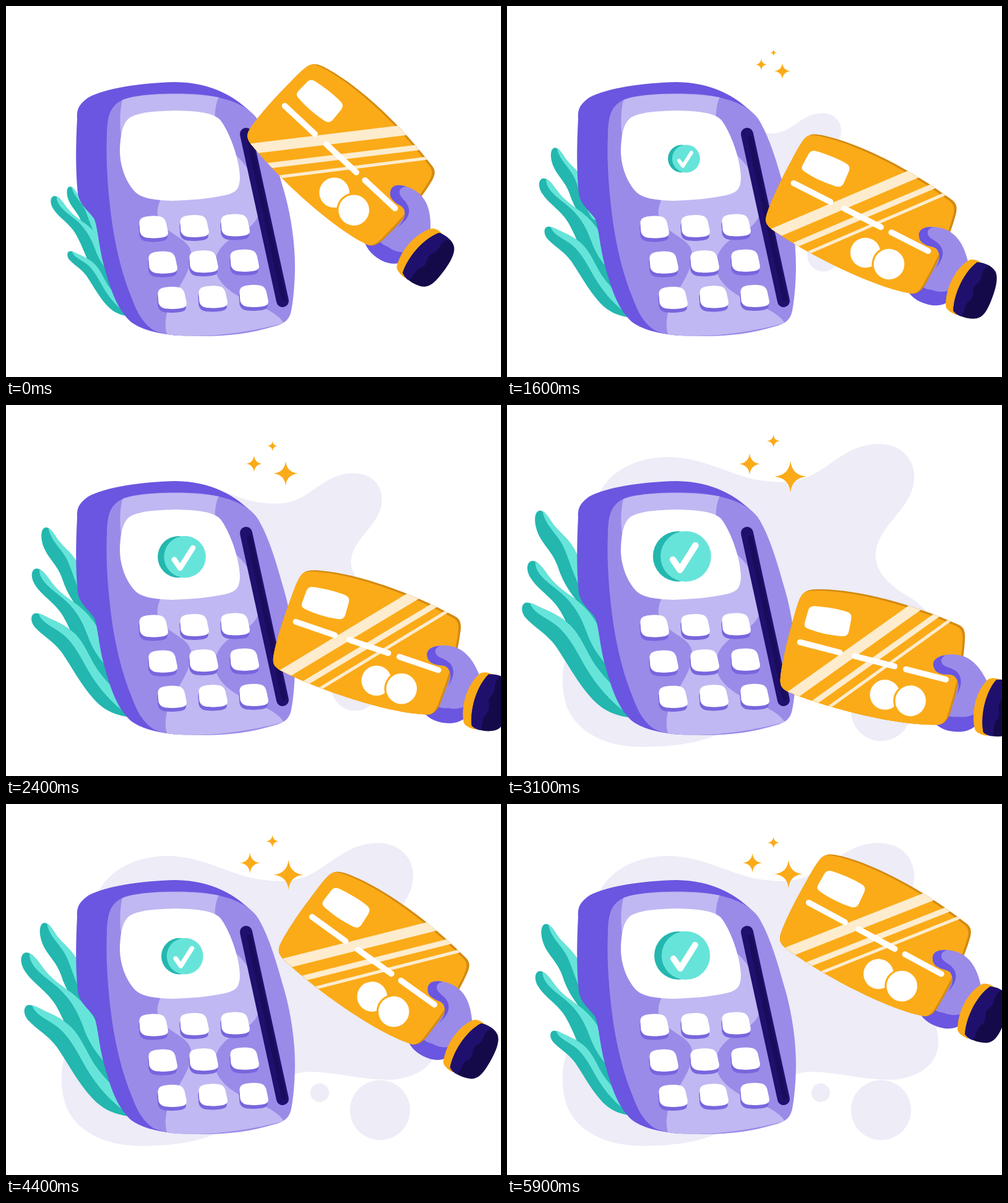
Write an HTML page with a canvas that moves like this. It is 800 by 600 pixels and loops after 6000 ms.

```html
<!DOCTYPE html>
<html lang="en">
<head>
<meta charset="utf-8">
<title>Card payment</title>
<style>
  html, body { margin: 0; width: 100%; height: 100%; overflow: hidden; background: #fff; }
  canvas { display: block; width: 800px; height: 600px; }
</style>
</head>
<body>
<canvas id="stage" width="800" height="600"></canvas>
<script>
const ctx = document.getElementById('stage').getContext('2d');
const LOOP = 6000, STEP = 100;

const C = {
  violet: '#6a56e0', lilac: '#9a8be9', pale: '#c0b8f2', keyShade: '#7766dd',
  navy: '#20106e', ink: '#150a49', orange: '#fbab18', rim: '#d48a10', cream: '#fdecce',
  teal: '#67e4da', deepTeal: '#23b7af', mist: '#edecf7', white: '#fff'
};

// Key times and values of each moving part
const KEYS = {
  cardX: [[0, 391], [3000, 442], [4500, 441]],
  cardY: [[0, 205], [3000, 467], [4500, 216.5]],
  cardAngle: [[0, 24.2], [3000, -6], [4500, 18.6], [5900, 9.6]],
  blob: [[0, 0], [3000, 1]],
  badge: [[0, 0], [3000, 97], [4060, 62.5], [5900, 90]],
  sparkle: [[0, 0], [3600, 1.05], [5200, .655], [5900, .8]]
};

const LEAVES = [
  { base: [188, 496], keys: [[0, .63], [3400, 1.04], [5200, .855], [5900, .932]],
    body: 'M53 172C44 174 44 191 50 207C58 227 74 238 82 261C91 290 107 313 127 332L160 400L180 380L140 300C125 275 118 250 108 232C96 213 83 206 73 191C66 180 61 172 53 172Z',
    light: 'M58 173C62 196 82 210 91 229C102 252 108 282 128 312L150 320L140 300C125 275 118 250 108 232C96 213 83 206 73 191C68 183 64 176 58 173Z' },
  { base: [190, 472], keys: [[0, .707], [4100, 1.02], [5900, .866]],
    body: 'M31 239C22 241 21 255 29 268C42 289 66 301 80 325C97 354 108 391 125 421C141 449 162 478 195 498L205 440L150 360C137 333 124 319 105 304C85 290 72 281 60 265C50 251 41 238 31 239Z',
    light: 'M37 241C37 261 58 275 75 289C103 311 115 334 125 361C135 390 155 418 185 440L200 430L150 360C137 333 124 319 105 304C85 290 72 281 60 265C52 254 45 244 37 241Z' },
  { base: [197, 497], keys: [[0, .532], [3680, 1.016], [5900, .69]],
    body: 'M21 308C12 309 10 322 19 334C34 351 55 361 71 383C91 412 108 446 134 474C154 495 175 503 200 506L200 475C170 455 154 436 138 414C123 391 115 366 96 347C79 331 61 324 46 317C36 312 29 308 21 308Z',
    light: 'M27 309C33 327 54 333 73 348C95 366 108 394 123 420C143 453 165 478 194 499L200 475C170 455 154 436 138 414C123 391 115 366 96 347C79 331 61 324 46 317C38 313 33 310 27 309Z' }
];

for (const leaf of LEAVES) {
  leaf.body = new Path2D(leaf.body);
  leaf.light = new Path2D(leaf.light);
}

const P = Object.fromEntries(Object.entries({
  blob: 'M140 170C150 115 200 84 262 84C320 85 365 116 410 122C447 127 473 126 501 109C533 90 557 63 602 63C638 64 660 88 658 121C655 158 622 181 604 213C580 257 612 289 651 311C679 329 697 352 697 386C697 421 665 444 620 446C574 446 530 433 490 433C430 434 400 500 340 533C300 550 256 553 215 553C157 552 115 528 99 493C86 463 87 421 100 395C125 350 150 330 143 260C139 225 136 195 140 170Z',
  shell: 'M115 182C114 164 120 158 133 148C160 133 219 124 274 123C333 124 371 146 402 178L440 280L450 500L280 533C240 530 217 522 202 511C178 489 168 455 158 419C150 389 149 363 143 345C136 333 119 323 116 303C112 262 113 221 115 182Z',
  face: 'M163 207C164 177 168 161 190 151C215 141 280 140 315 143C355 148 386 158 405 181C425 211 439 263 449 298C461 339 467 385 467 421C467 449 464 480 461 493C458 508 449 514 434 518C397 529 361 534 320 534C286 534 255 533 238 524C219 511 211 493 203 472C189 438 179 399 172 355C165 304 161 256 163 207Z',
  faceTop: 'M188 152C220 140 290 140 344 147C338 160 337 174 338 192L187 218C183 190 184 170 188 152Z',
  faceMid: 'M250 312C245 325 241 337 250 350C263 370 297 377 299 399C302 429 275 457 263 486C257 504 256 520 261 533C320 537 385 530 449 513C441 499 420 489 397 479C361 465 339 445 337 420C337 398 354 380 374 370C396 359 411 345 410 323C408 293 393 259 372 242Z',
  screen: 'M184 234C185 205 189 188 201 180C217 171 246 170 273 169C309 170 334 172 346 184C360 201 377 245 378 276C378 297 371 302 354 306C327 312 297 314 269 315C238 314 220 311 209 301C193 284 184 258 184 234Z',
  key: 'M-23 -5C-23 -15 -18 -17 -2 -18C13 -18 17 -16 20 -8L23 6C25 15 20 17 3 18C-13 18 -19 17 -22 8Z',
  card: 'M432 413C432 401 443 362 453 334C462 310 469 287 476 277C483 267 493 267 507 268C570 273 656 304 724 341C735 346 736 354 735 364C731 399 719 440 706 473C700 491 695 499 683 501C626 500 519 467 444 430C436 425 432 421 432 413Z',
  chip: 'M486 300C489 294 494 294 500 295C518 298 535 302 549 308C555 311 555 315 554 320L549 338C547 346 542 348 534 346C516 343 500 338 485 331C478 328 477 325 479 319Z',
  palm: 'M674 496C684 509 700 515 719 515C735 514 746 506 750 495L755 435L700 435Z',
  palmLight: 'M695 486C710 496 730 489 743 472L766 440L748 410L705 410Z',
  thumb: 'M681 407C678 396 690 389 706 389C738 388 755 410 766 439L744 486C733 494 712 493 703 485C716 464 724 441 715 427C710 419 701 423 692 419C686 417 682 413 681 407Z',
  thumbShade: 'M681 407C678 396 690 390 701 390C692 394 692 402 699 407C705 411 714 412 720 421C727 433 721 444 715 456C719 444 721 436 715 427C710 419 701 423 692 419C686 417 682 413 681 407Z',
  cuff: 'M767 434C774 431 782 433 789 437L759 525C750 523 742 519 740 514C735 490 744 452 767 434Z',
  sleeve: 'M780 436C794 435 805 439 811 446C819 457 815 479 810 499C806 514 801 523 792 526C778 530 760 526 753 519C750 496 759 457 780 436Z',
  sleeveLight: 'M780 436C789 435 795 437 799 439C785 450 795 462 784 471C775 480 787 490 776 500C768 507 773 520 766 526C760 525 756 522 753 519C750 496 759 457 780 436Z'
}).map(([name, d]) => [name, new Path2D(d)]));

function at(keys, t) {
  let [t0, v0] = keys[0];
  for (const [t1, v1] of keys) {
    if (t < t1) return v0 + (v1 - v0) * (t - t0) / (t1 - t0);
    [t0, v0] = [t1, v1];
  }
  return v0;
}

function fill(path, color) {
  ctx.fillStyle = color;
  ctx.fill(path);
}

function disc(x, y, r, color) {
  ctx.fillStyle = color;
  ctx.beginPath();
  ctx.arc(x, y, r, 0, Math.PI * 2);
  ctx.fill();
}

function line(points, width, color) {
  ctx.strokeStyle = color;
  ctx.lineWidth = width;
  ctx.lineCap = ctx.lineJoin = 'round';
  ctx.beginPath();
  points.forEach(([x, y]) => ctx.lineTo(x, y));
  ctx.stroke();
}

function group(draw) {
  ctx.save();
  draw();
  ctx.restore();
}

function scaledAbout(x, y, s, draw) {
  if (s <= 0) return;
  group(() => {
    ctx.translate(x, y);
    ctx.scale(s, s);
    ctx.translate(-x, -y);
    draw();
  });
}

function drawBlob(t) {
  scaledAbout(405, 299, at(KEYS.blob, t), () => {
    fill(P.blob, C.mist);
    disc(604.5, 495, 48.5, C.mist);
    disc(507, 467, 15, C.mist);
  });
}

function drawLeaves(t) {
  for (const { base, keys, body, light } of LEAVES) {
    scaledAbout(...base, at(keys, t), () => {
      fill(body, C.deepTeal);
      fill(light, C.teal);
    });
  }
}

function drawTerminal() {
  fill(P.shell, C.violet);
  fill(P.face, C.lilac);
  group(() => {
    ctx.clip(P.face);
    fill(P.faceTop, C.pale);
    fill(P.faceMid, C.pale);
  });
  fill(P.screen, C.white);
  line([[388, 207], [447, 477]], 20, C.navy);
  line([[393, 215], [449, 474]], 8, '#190c5c');
  for (let row = 0; row < 3; row++) {
    for (let col = 0; col < 3; col++) {
      group(() => {
        ctx.translate(238.5 + col * 66 + row * 15, 357.5 - col * 1.5 + row * 57.2);
        group(() => {
          ctx.translate(-1, 6);
          fill(P.key, C.keyShade);
        });
        fill(P.key, C.white);
      });
    }
  }
}

function drawBadge(t) {
  scaledAbout(290, 249.5, at(KEYS.badge, t) / 90, () => {
    disc(277, 245, 39, C.deepTeal);
    disc(289, 245, 39.2, C.teal);
    line([[269, 250], [280, 266], [304, 228]], 10, C.white);
  });
}

function drawCardFace() {
  fill(P.card, C.rim);
  group(() => {
    ctx.clip(P.card);
    group(() => {
      ctx.translate(-4, 2);
      fill(P.card, C.orange);
    });
    ctx.fillStyle = C.orange;
    ctx.fillRect(428, 380, 235, 125);
    ctx.clip(P.card);
    const stripes = [[650.5, 313.5, 455, 432, 17], [683, 329.5, 476, 455, 9], [705.5, 338, 506, 460.5, 5]];
    for (const [x1, y1, x2, y2, width] of stripes) {
      line([[x1 + 17, y1 - 10], [x2 - 17, y2 + 10]], width, C.cream);
    }
  });
  fill(P.chip, C.white);
  for (const [x, y] of [[468.5, 351], [555, 380], [636, 407.5]]) {
    line([[x, y], [x + 63, y + 21.5]], 9.5, C.white);
  }
  disc(599, 446, 24.3, C.white);
  disc(639.5, 459, 28, C.orange);
  disc(639.5, 459, 24.8, C.white);
}

function drawCard(t) {
  group(() => {
    ctx.translate(at(KEYS.cardX, t), at(KEYS.cardY, t));
    ctx.rotate(at(KEYS.cardAngle, t) * Math.PI / 180);
    ctx.translate(-432, -415);
    fill(P.palm, C.violet);
    fill(P.palmLight, C.lilac);
    drawCardFace();
    fill(P.thumb, C.lilac);
    fill(P.thumbShade, C.violet);
    fill(P.cuff, C.orange);
    fill(P.sleeve, C.ink);
    fill(P.sleeveLight, C.navy);
  });
}

function star(x, y, r) {
  const k = r * .09;
  ctx.fillStyle = C.orange;
  ctx.beginPath();
  ctx.moveTo(x, y - r);
  ctx.quadraticCurveTo(x + k, y - k, x + r, y);
  ctx.quadraticCurveTo(x + k, y + k, x, y + r);
  ctx.quadraticCurveTo(x - k, y + k, x - r, y);
  ctx.quadraticCurveTo(x - k, y - k, x, y - r);
  ctx.fill();
}

function drawSparkles(t) {
  scaledAbout(431, 94, at(KEYS.sparkle, t), () => {
    star(461, 118, 28.5);
    star(388, 95.5, 19.5);
    star(430.5, 54.5, 11.5);
  });
}

function render(t) {
  ctx.fillStyle = C.white;
  ctx.fillRect(0, 0, 800, 600);
  drawBlob(t);
  drawLeaves(t);
  drawTerminal();
  drawBadge(t);
  drawSparkles(t);
  drawCard(t);
}

const start = performance.now();
function tick() {
  const elapsed = performance.now() - start;
  render(Math.floor(elapsed / STEP) * STEP % LOOP);
  requestAnimationFrame(tick);
}
tick();
</script>
</body>
</html>
```
